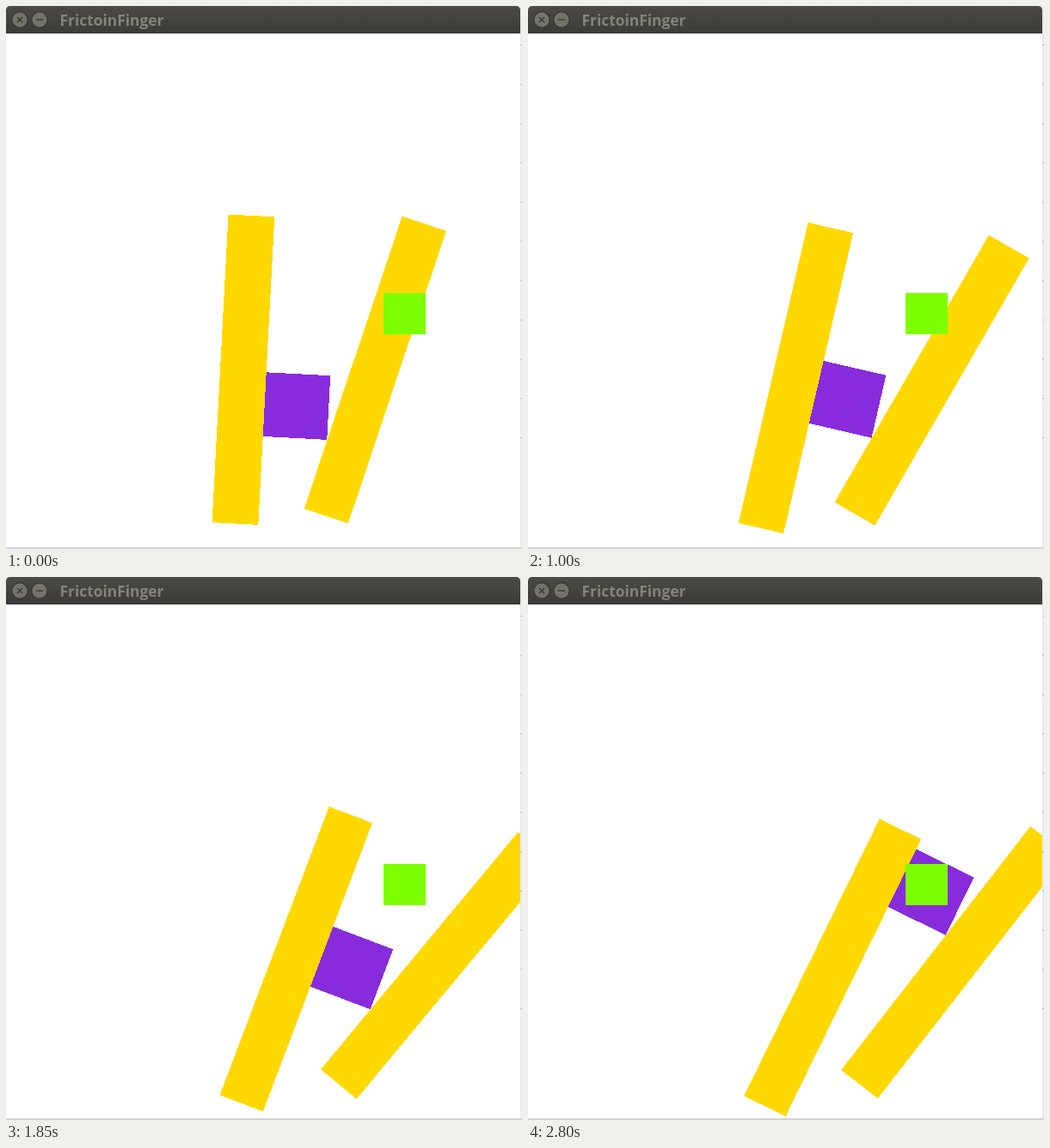
These frames come from a looping animation (600 px wide and 632 px high, 2.85 s). An HTML page:

```html
<!DOCTYPE html>
<html>
<head>
<meta charset="utf-8">
<style>
  html, body { margin: 0; height: 100%; overflow: hidden; background: #fff; }
  svg { display: block; }
  text { font: bold 17.4px "Open Sans", "Noto Sans", sans-serif; fill: #85827b; }
</style>
</head>
<body>
<svg width="600" height="632" viewBox="0 0 600 632">
  <defs>
    <linearGradient id="bar" x2="0" y2="1">
      <stop offset="0" stop-color="#4b4a45"/>
      <stop offset="1" stop-color="#3c3b37"/>
    </linearGradient>
    <clipPath id="window"><rect width="598" height="630"/></clipPath>
  </defs>

  <rect x="598" width="2" height="632" fill="#e9e9e9"/>
  <path d="M599 45V520" stroke="#b5b5b5" stroke-width="2" stroke-dasharray="1 44.7"/>
  <path d="M0 631H600" stroke="#d2d2d2" stroke-width="2"/>

  <path d="M0 32V5Q0 0 5 0H593Q598 0 598 5V32Z" fill="url(#bar)"/>
  <g fill="#74726b" stroke="#3c3b37" stroke-width="1.6">
    <circle cx="16" cy="16" r="9.3"/>
    <circle cx="39" cy="16" r="9.3"/>
    <path d="M13 13l6 6m0-6l-6 6M35 16h8"/>
  </g>
  <text x="62.5" y="22.5">FrictoinFinger</text>

  <g clip-path="url(#window)" shape-rendering="crispEdges">
    <rect id="block" x="53" width="75.4" height="74.7" fill="#882bdc"/>
    <rect id="left" y="-389" width="53.8" height="359" fill="#ffd800"/>
    <rect id="right" x="-54" y="-389" width="54" height="359" fill="#ffd800"/>
    <rect x="439" y="334" width="48.5" height="47.5" fill="#7dff00"/>
  </g>
</svg>
<script>
const LOOP = 2850, STEP = 50;
const BLOCK_RIGHT = 128.4, BLOCK_SIZE = 74.7, FINGER_WIDTH = 54.3;
const pivotL = { x: 238, y: 631 }, pivotR = { x: 388.4, y: 630.6 };
const [block, left, right] = ["block", "left", "right"].map(id => document.getElementById(id));
const deg = Math.PI / 180;
const clamp = (v, lo, hi) => Math.max(lo, Math.min(hi, v));

function place(shape, pivot, angle) {
  shape.setAttribute("transform", `translate(${pivot.x} ${pivot.y}) rotate(${angle})`);
}

// Angle of the left finger and height of the block along it:
// both fingers swing, rest, then the block slides up.
function pose(step) {
  const swing = Math.min(step, 35.4);
  const slide = clamp((step - 39.7) * 8.29, 0, 116);
  return {
    angle: 3.03 + 0.5 * swing + 0.0757 * slide - 0.000257 * slide * slide,
    top: 207.8 + 1.35 * swing + 0.0035 * swing * swing + slide
  };
}

// The right finger leans so that its inner edge touches the block's lower corner.
function rightAngle(angle, top) {
  const sin = Math.sin(angle * deg), cos = Math.cos(angle * deg);
  const low = top - BLOCK_SIZE;
  const dx = pivotL.x + BLOCK_RIGHT * cos + low * sin - pivotR.x;
  const dy = pivotL.y + BLOCK_RIGHT * sin - low * cos - pivotR.y;
  return (Math.atan2(dx, -dy) + Math.asin(FINGER_WIDTH / Math.hypot(dx, dy))) / deg;
}

function draw() {
  const { angle, top } = pose(Math.floor(performance.now() % LOOP / STEP));
  block.setAttribute("y", -top);
  place(block, pivotL, angle);
  place(left, pivotL, angle);
  place(right, pivotR, rightAngle(angle, top));
  requestAnimationFrame(draw);
}
draw();
</script>
</body>
</html>
```
